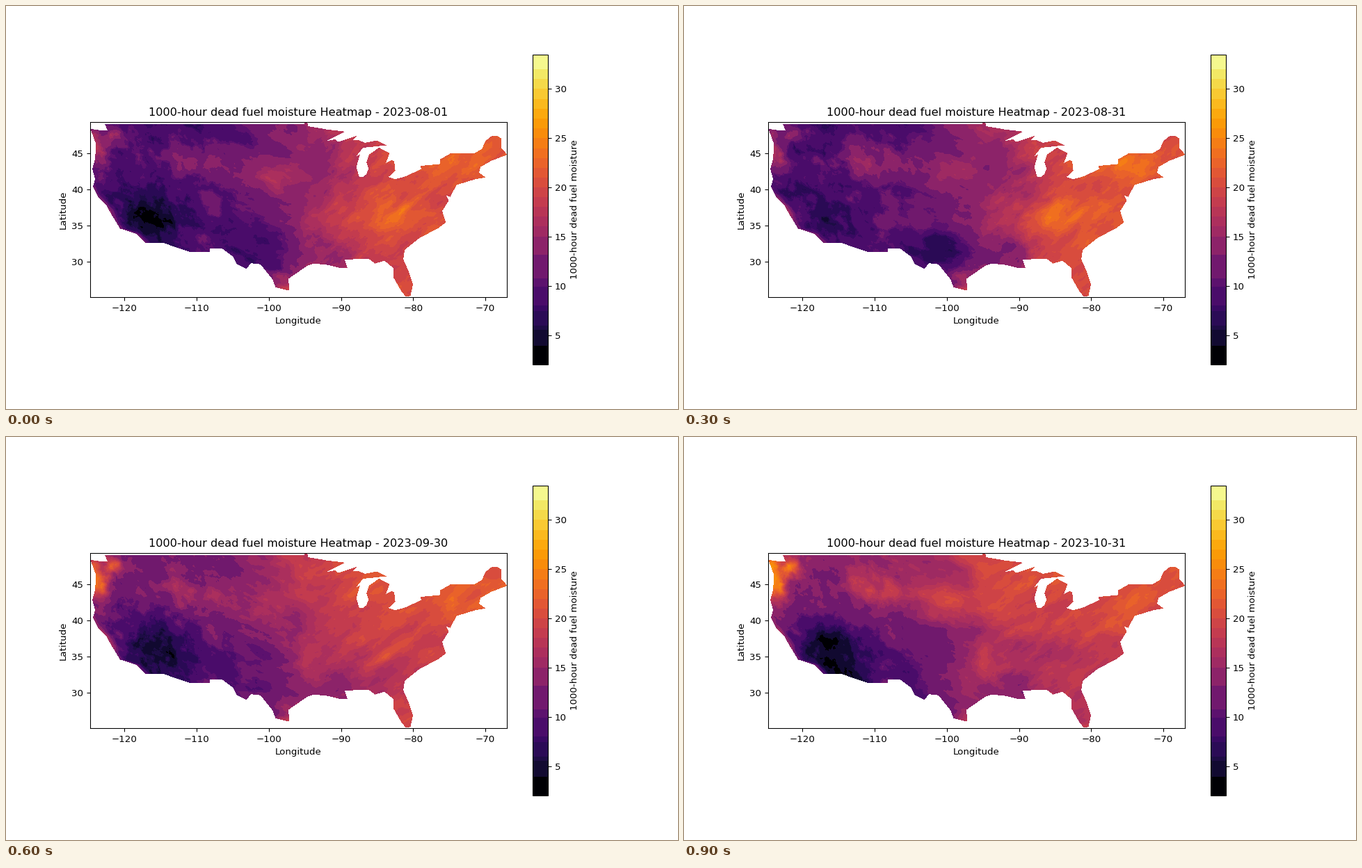
Animation of 966 by 580 pixels, one loop 1000 ms. Source, as a matplotlib script:

```python
import numpy as np
import matplotlib.pyplot as plt
from matplotlib.animation import FuncAnimation
from matplotlib.colors import ListedColormap
from matplotlib.path import Path

STEPS, INTERVAL = 10, 100
EXTENT = (-124.79, -67.04, 25.046, 49.42)
VMIN, VMAX = 2, 33.5
NX, NY = 599, 253

# Key points of the outline as (lon, lat), counter-clockwise from the north-west.
PACIFIC = [
    (-122.75, 49), (-122.4, 48.2), (-123, 48.12), (-124.75, 48.38), (-124, 46.3),
    (-124.1, 44.2), (-124.5, 42.8), (-124.1, 41.4), (-124.4, 40.4), (-123.7, 38.95),
    (-122.5, 37.7), (-121.9, 36.6), (-120.65, 34.55), (-119.2, 34.1), (-118.4, 33.8),
    (-117.12, 32.53),
]
SOUTH = [
    (-114.75, 32.6), (-111.07, 31.33), (-108.2, 31.33), (-108.2, 31.78), (-106.5, 31.78),
    (-105, 30.65), (-104.5, 29.65), (-103.15, 28.97), (-102.5, 29.75), (-101.2, 29.6),
    (-99.5, 27.5), (-99.1, 26.4), (-97.2, 25.95), (-97.3, 27.6), (-94.7, 29.4),
    (-93.8, 29.7), (-91.8, 29.5), (-90.2, 29.1), (-89.15, 29.1), (-89.5, 30.25),
    (-86.2, 30.38), (-85.3, 29.7), (-84, 30.1), (-82.8, 29.1), (-82.8, 27.85),
    (-81.75, 26), (-81.1, 25.15),
]
ATLANTIC = [
    (-80.4, 25.2), (-80.05, 26.8), (-80.6, 28.5), (-81.4, 30.3), (-81.2, 31.6),
    (-79.2, 33.2), (-77.9, 33.9), (-76.5, 34.65), (-75.5, 35.4), (-76, 37),
    (-75.1, 38.4), (-75.4, 39.1), (-74.9, 38.95), (-74, 40.6), (-71.4, 41.4),
    (-70, 41.65), (-70.9, 42.3), (-70.7, 43.1), (-69.2, 43.95), (-66.97, 44.8),
]
NORTH_EAST = [
    (-67.8, 45.7), (-67.8, 47.05), (-68.3, 47.35), (-69.1, 47.42), (-70, 46.7),
    (-70.5, 45.6), (-71.5, 45), (-74.8, 45), (-76.3, 44.15), (-76.3, 43.5),
    (-79, 43.25), (-78.9, 42.8), (-81.2, 41.75), (-82.5, 41.4), (-83.45, 41.7),
    (-82.5, 42.6), (-82.65, 43.85), (-83, 44.07), (-83.8, 43.65), (-83.3, 45),
]
LAKES = [
    (-84.75, 45.78), (-86.15, 44.8), (-86.5, 43.7), (-86.2, 42.9), (-86.5, 42.1),
    (-87, 41.68), (-87.5, 41.68), (-87.9, 43.1), (-87.4, 44.85), (-87.9, 44.6),
    (-87, 45.75), (-84.7, 46), (-83.5, 46), (-84.5, 46.47), (-85, 46.77),
    (-86.7, 46.45), (-87.7, 46.85), (-88.4, 46.85), (-87.8, 47.45), (-90.4, 46.57),
    (-90.8, 46.92), (-92.05, 46.7), (-89.5, 48), (-92, 48.3), (-94.6, 48.75),
    (-94.7, 49.3), (-95.1, 49.4), (-95.15, 49),
]

west, east, south, north = EXTENT
lon, lat = np.meshgrid(west + (np.arange(NX) + 0.5) * (east - west) / NX,
                       south + (np.arange(NY) + 0.5) * (north - south) / NY)


def noise(seed, size, stretch=1, tilt=0):
    """Unit-variance fractal noise, elongated along the tilt angle."""
    spectrum = np.fft.fft2(np.random.default_rng(seed).normal(size=(NY, NX)))
    fx, fy = np.meshgrid(np.fft.fftfreq(NX), np.fft.fftfreq(NY))
    along = (np.cos(tilt) * fx + np.sin(tilt) * fy) * stretch
    across = np.cos(tilt) * fy - np.sin(tilt) * fx
    spectrum *= 1 / (1 + (along**2 + across**2) * (6.3 * size)**2)
    field = np.fft.ifft2(spectrum).real
    return (field - field.mean()) / field.std()


def smoothstep(x):
    x = np.clip(x, 0, 1)
    return x * x * (3 - 2 * x)


def land_mask():
    outline = Path(PACIFIC + SOUTH + ATLANTIC + NORTH_EAST + LAKES)
    points = np.column_stack([lon.ravel(), lat.ravel()])
    return outline.contains_points(points).reshape(lon.shape)


def coastal_strip():
    """Damp air along the Californian shore, fading inland."""
    shore_lon, shore_lat = np.array(PACIFIC[::-1]).T
    inland = np.maximum(lon - np.interp(lat, shore_lat, shore_lon), 0)
    return 5 * np.exp(-(inland / 0.6)**2) * smoothstep((42 - lat) / 4)


land = land_mask()
warp_lon = lon + 0.6 * noise(1, 14)
warp_lat = lat + 0.5 * noise(2, 14)
eastness = (1 + np.tanh((warp_lon + 96) / 9)) / 2
mountains = smoothstep((-101 - lon) / 8)
ridge = 1.5 * np.exp(-((lat - 37.3 - 0.75 * (lon + 81)) / 0.8)**2 - ((lon + 81) / 4)**2)
relief = np.abs(noise(3, 9, 1.5, 1.9)) - 0.8
terrain = coastal_strip() + ridge + 1.1 * mountains * relief


def moisture(step):
    autumn = smoothstep((step - 3) / 5)
    monsoon = np.exp(-((step - 2.5) / 2)**2)

    def region(x, y, width, height, summer, fall, pulse=0):
        level = summer + (fall - summer) * autumn + pulse * monsoon
        distance = ((warp_lon - x) / width)**2 + ((warp_lat - y) / height)**2
        return level * np.exp(-distance)

    dry, damp = 8.5 + 2.5 * autumn, 20.5 - 0.5 * autumn
    field = dry + (damp - dry) * eastness
    field += 4 * autumn * (1 - 0.5 * eastness) * np.clip((warp_lat - 40) / 9, -0.9, 1)
    field += region(-115.5, 36, 4.5, 3.5, -5, -5.5, 3.5)      # Mojave
    field += region(-124, 46.5, 2, 4, 7, 11)                  # Pacific north-west
    field += region(-110.5, 44, 4, 2.5, 1.5, 4, 3.5)          # northern Rockies
    field += region(-108.5, 35, 1.6, 1.6, 0, 0, 4)            # New Mexico
    field += region(-101, 42.5, 6, 3, 4, 3.5)                 # high plains
    field += region(-100, 31.5, 6, 3, -4, 3, -1)              # Texas
    field += region(-97.3, 26.8, 1.5, 1.5, 5, 5)              # lower Rio Grande
    field += region(-94.5, 34.5, 2.5, 2, 1, 4)                # Ozarks
    field += region(-91.5, 31, 3, 2, -0.5, -2, -4)            # lower Mississippi
    field += region(-92.5, 43, 4, 4, -2.5, 1.5, -1)           # upper Midwest
    field += region(-83, 36, 5, 2.5, 2, -1.5, 1)              # Appalachia
    field += region(-73.5, 43, 3.5, 2, 2, 1, 1.5)             # New England

    plains = noise(20 + step, 8, 2.5, -0.35)
    streaks = noise(40 + step, 7, 2.5, 0.6)
    blend = smoothstep((lon + 98) / 8)
    weather = (1 - blend) * plains + blend * streaks
    return np.where(land, field + terrain + 0.7 * weather, np.nan)


def banded_inferno():
    """Inferno in flat bands about one unit wide, wider at the dark end."""
    edges = np.r_[VMIN, 3.9, 5.5, 6, 7.4, 8, 9.9, 10.7, 13.1, 15, np.arange(16, 33), VMAX]
    values = np.linspace(VMIN, VMAX, 512)
    band = np.clip(np.digitize(values, edges) - 1, 0, len(edges) - 2)
    shades = plt.get_cmap("inferno")(np.linspace(0, 1, 512))
    means = np.array([shades[band == b].mean(axis=0) for b in range(len(edges) - 1)])
    means[0] = shades[0]
    return ListedColormap(means[band])


fig, ax = plt.subplots(figsize=(10, 6.0042), dpi=96.6)
image = ax.imshow(moisture(0), origin="lower", extent=EXTENT, cmap=banded_inferno(),
                  vmin=VMIN, vmax=VMAX, interpolation="nearest")
fig.colorbar(image, ax=ax, label="1000-hour dead fuel moisture")
ax.set_xlabel("Longitude")
ax.set_ylabel("Latitude")
title = ax.set_title("")


def update(step):
    date = np.datetime64("2023-08-01") + step * 91 // (STEPS - 1)
    image.set_data(moisture(step))
    title.set_text(f"1000-hour dead fuel moisture Heatmap - {date}")
    return image, title


animation = FuncAnimation(fig, update, frames=STEPS, interval=INTERVAL, repeat=True)
plt.show()
```
